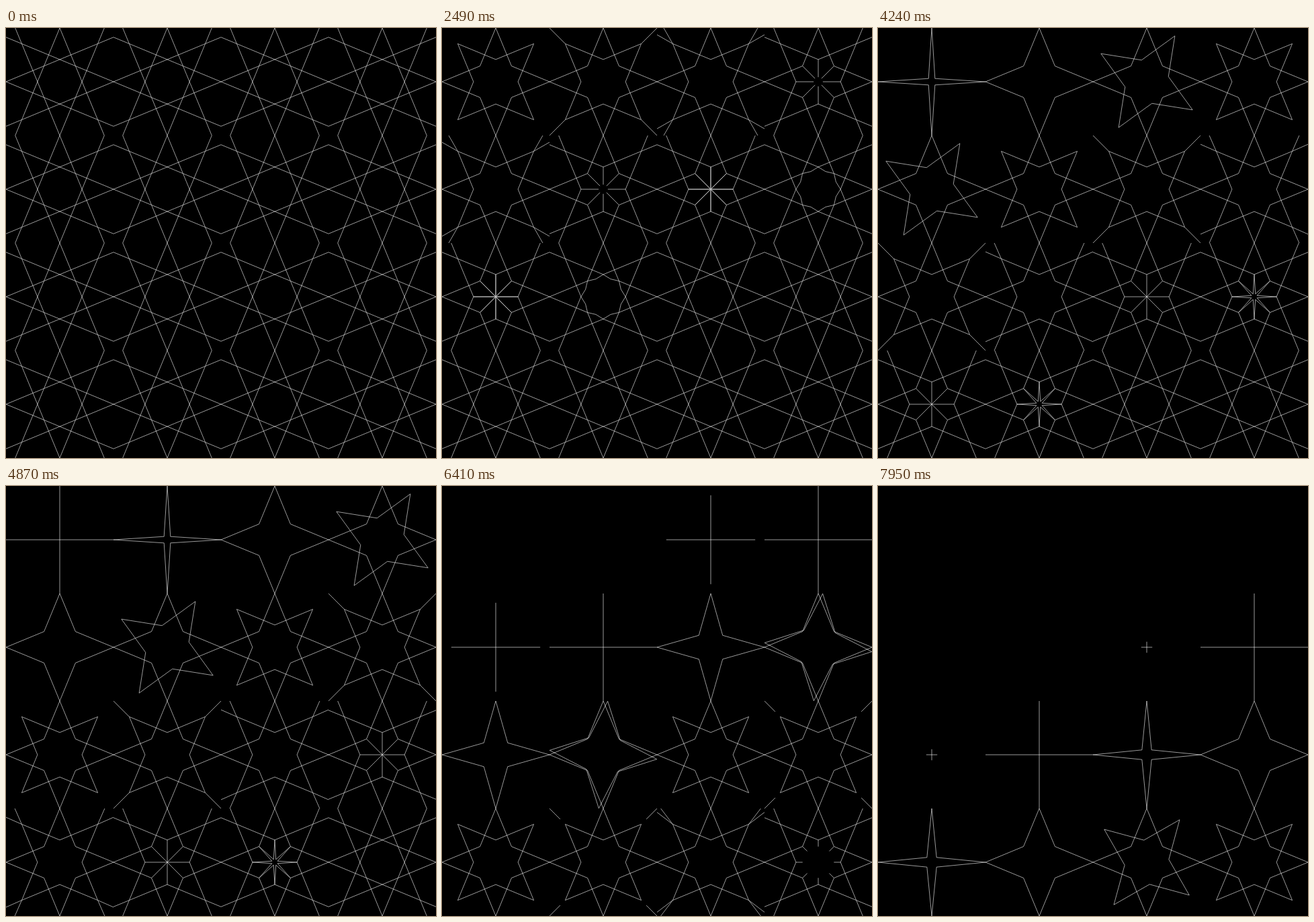
An HTML page with a canvas for the animation above (8000 ms loop, 640x640 px).

```html
<!DOCTYPE html>
<html lang="en">
<head>
<meta charset="utf-8">
<title>Star lattice</title>
<style>
  html, body { margin: 0; width: 100%; height: 100%; overflow: hidden; background: #000; }
  canvas { display: block; width: 640px; height: 640px; }
</style>
</head>
<body>
<canvas id="stage" width="640" height="640"></canvas>
<script>
const ctx = document.getElementById('stage').getContext('2d');

const LOOP = 8000;
const COUNT = 4;
const CELL = 160;
const LINE = 0.6;
const TIP = CELL / 2;
const EIGHTH = Math.PI / 4;
const EDGE = TIP * Math.sin(EIGHTH / 2);       // centre to octagon edge
const CORNER = EDGE / Math.cos(EIGHTH / 2);    // centre to octagon corner
const POINT = TIP * Math.SQRT1_2;              // diagonal star point, per axis
const EXIT = TIP * Math.tan(EIGHTH / 2) + CORNER; // where a line leaves the cell
const LAG = 9;                                 // ticks between neighbouring cells

// [first tick, last tick] of each step in a cell's life
const STEPS = {
  fold: [0, 12],
  clear: [18.2, 24.2],
  pinch: [25.7, 35.2],
  trim: [37.7, 43.7],
  turn: [50.5, 60],
  thin: [62.6, 76],
  shrink: [82.9, 90.6]
};

function progress(name, n) {
  const [from, to] = STEPS[name];
  const t = Math.min(1, Math.max(0, (n - from) / (to - from)));
  return (1 - Math.cos(Math.PI * t)) / 2;
}

// The first twenty ticks run faster than the rest.
function tickAt(ms) {
  return Math.floor(ms < 600 ? ms / 30 : 20 + (ms - 600) / 70);
}

function polar(r, a) {
  return [r * Math.cos(a), r * Math.sin(a)];
}

function trace(x, y, points, closed) {
  points.forEach(([px, py], i) => {
    if (i) ctx.lineTo(x + px, y + py);
    else ctx.moveTo(x + px, y + py);
  });
  if (closed) ctx.closePath();
}

function star(x, y, tip, valley, angle) {
  const points = [];
  for (let i = 0; i < 8; i++) {
    points.push(polar(i % 2 ? valley : tip, angle + i * EIGHTH));
  }
  trace(x, y, points, true);
}

function core(x, y, n) {
  const clear = progress('clear', n);
  if (clear === 1) return;
  const fold = progress('fold', n);
  if (fold < 1) {
    const points = [];
    for (let i = 0; i < 8; i++) {
      points.push(polar(CORNER, i * EIGHTH));
      points.push(polar(EDGE * (1 - fold), (i + 0.5) * EIGHTH));
    }
    trace(x, y, points, true);
    return;
  }
  for (let i = 0; i < 8; i++) {
    trace(x, y, [polar(CORNER * clear, i * EIGHTH), polar(CORNER, i * EIGHTH)]);
  }
}

function whiskers(x, y, n) {
  const trim = progress('trim', n);
  if (trim === 1) return;
  const end = EXIT + (TIP - EXIT) * progress('pinch', n);
  const start = POINT + (TIP - POINT) * trim;
  for (const sx of [-1, 1]) {
    for (const sy of [-1, 1]) {
      trace(x, y, [[sx * start, sy * start], [sx * TIP, sy * end]]);
      if (end < TIP) trace(x, y, [[sx * start, sy * start], [sx * end, sy * TIP]]);
    }
  }
}

function cell(x, y, n) {
  const shrink = progress('shrink', n);
  if (shrink === 1) return;
  const tip = TIP * (1 - shrink);
  const thin = progress('thin', n);
  if (thin === 1) {
    trace(x, y, [[-tip, 0], [tip, 0]]);
    trace(x, y, [[0, -tip], [0, tip]]);
    return;
  }
  const valley = CORNER * (1 - thin);
  const turn = progress('turn', n);
  star(x, y, tip, valley, 0);
  if (turn < 1) star(x, y, tip, valley, EIGHTH * (1 - turn));
  core(x, y, n);
  whiskers(x, y, n);
}

function draw(ms) {
  const tick = tickAt(ms);
  ctx.fillStyle = '#000';
  ctx.fillRect(0, 0, 640, 640);
  ctx.strokeStyle = '#fff';
  ctx.lineWidth = LINE;
  ctx.lineJoin = 'bevel';
  for (let row = 0; row < COUNT; row++) {
    for (let col = 0; col < COUNT; col++) {
      ctx.beginPath();
      cell((col + 0.5) * CELL, (row + 0.5) * CELL, tick - LAG * (col + 2 * row));
      ctx.stroke();
    }
  }
}

const began = performance.now();

function loop() {
  draw((performance.now() - began) % LOOP);
  requestAnimationFrame(loop);
}

loop();
</script>
</body>
</html>
```
